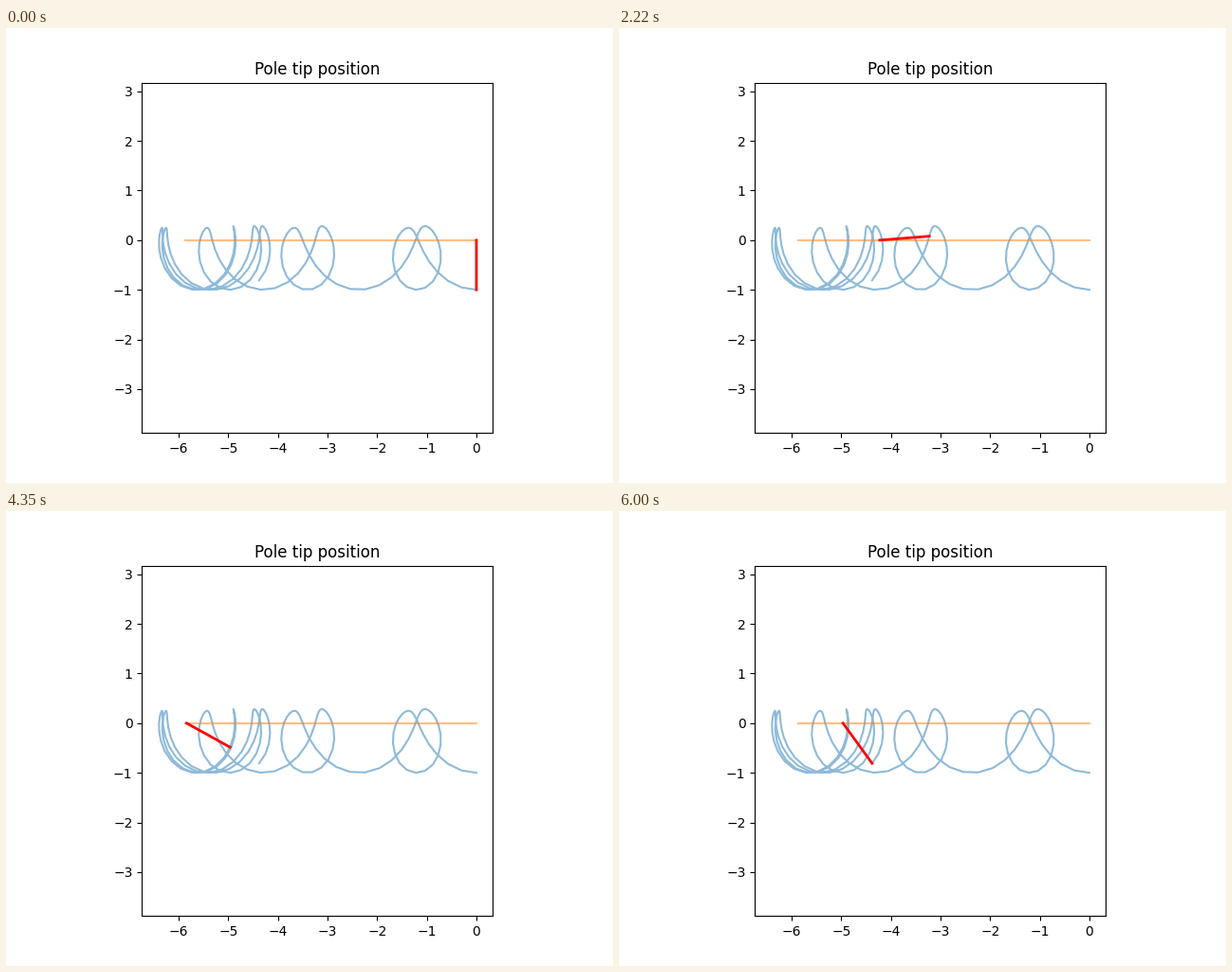
These frames come from a looping animation (640 by 480 pixels, 6.03 s). A matplotlib script:

```python
import numpy as np
import matplotlib.pyplot as plt
from matplotlib.animation import FuncAnimation

FRAMES = 201
PERIOD = 40.41      # frames per full swing
SWING = 1.842       # swing amplitude, radians
LEAN = 0.018        # the swing's centre sits slightly to the right
LEAD = 0.057        # time offset that makes the pole start upright
RECOIL = 0.21       # share of the swing taken up by the cart


def pole_angle(t):
    """Large-amplitude pendulum angle, starting at the bottom moving left."""
    s = np.sin(SWING / 2)
    u = np.linspace(0, 12 * np.pi, 24001)
    rate = 1 / np.sqrt(1 - (s * np.sin(u)) ** 2)
    time = np.append(0, np.cumsum((rate[1:] + rate[:-1]) / 2))
    time *= 6 * PERIOD / time[-1]
    phase = np.interp(t + LEAD, time, u)
    return LEAN - 2 * np.arcsin(s * np.sin(phase))


def drift(t):
    """Slow travel of the balance point: out to the left, then back."""
    q = 4 * t / PERIOD - 10
    return -4.975 - 0.287 * q + 0.02855 * q**2 + 4.82e-4 * q**3 - 2.68e-5 * q**4


t = np.arange(FRAMES)
theta = pole_angle(t)
cart = drift(t) - RECOIL * np.sin(theta)
tip_x = cart + np.sin(theta)
tip_y = -np.cos(theta)

fig, ax = plt.subplots(figsize=(6.4, 4.8), dpi=100)
ax.set_aspect("equal", adjustable="box")
ax.set_xlim(-6.739, 0.321)
ax.set_ylim(-3.885, 3.175)
ax.set_xticks(range(-6, 1))
ax.set_yticks(range(-3, 4))
ax.set_title("Pole tip position")

ax.plot(tip_x, tip_y, color="C0", alpha=0.5)
ax.plot(cart, np.zeros(FRAMES), color="C1", alpha=0.5)
pole, = ax.plot([], [], color="red", lw=2)


def update(i):
    pole.set_data([cart[i], tip_x[i]], [0, tip_y[i]])
    return pole,


anim = FuncAnimation(fig, update, frames=FRAMES, interval=30, repeat=True,
                     repeat_delay=0)
plt.show()
```
